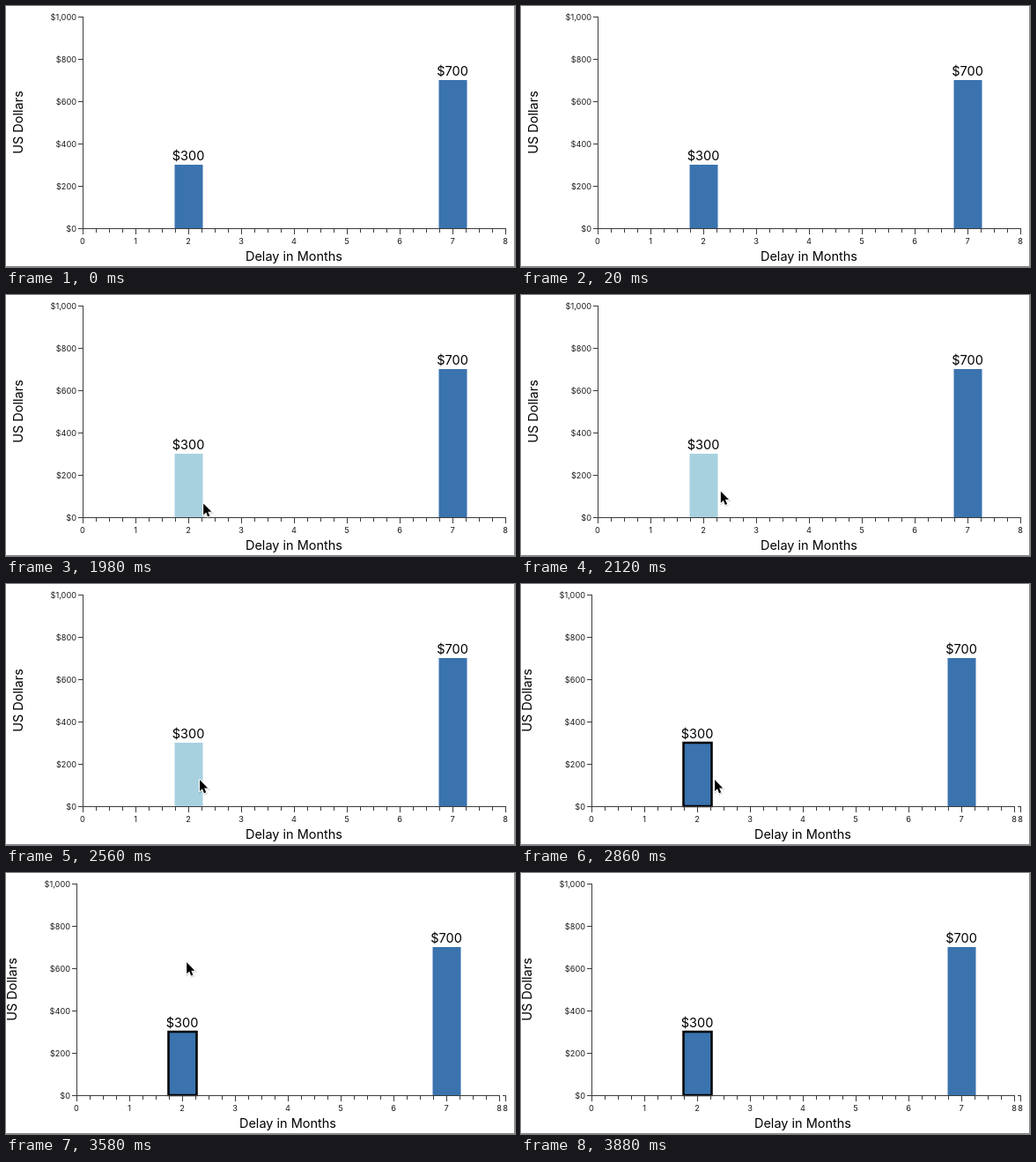
Write an HTML page that moves like this. It is 578x296 px and loops after 4980 ms.

```html
<!DOCTYPE html>
<html lang="en">
<head>
<meta charset="utf-8">
<title>Delay chart</title>
<style>
  html, body { margin: 0; width: 100%; height: 100%; overflow: hidden; background: #fff; }
  svg { display: block; width: 578px; height: 296px; }
  .tick { font: 9.2px Inter, sans-serif; fill: #1a1a1a; }
  .label { font: 14.5px Inter, sans-serif; fill: #000; text-anchor: middle; }
  .axis { fill: none; stroke: #3c3c3c; }
</style>
</head>
<body>
<svg id="stage" viewBox="0 0 578 296"></svg>
<script>
const LOOP = 4980, STEP = 20, CLICK = 2860, SHIFT = -7;
const BLUE = "#3a73ae", LIGHT = "#a8d1e0";
const LEFT = 87, BASE = 252, UNIT = 60;

const easeIn = k => k * k;
const easeOut = k => k * (2 - k);
const smooth = k => k * k * (3 - 2 * k);

// Pointer tip: each move starts where the one before ended
const enter = { x: 213, y: 293 };
const moves = [
  { start: 1760, end: 2160, x: 227, y: 222, ease: easeOut },
  { start: 2280, end: 2560, x: 220, y: 222, ease: smooth },
  { start: 3420, end: 3660, x: 200, y: 59, ease: smooth },
  { start: 3780, end: 3880, x: 201, y: -20, ease: easeIn }
];
const hovers = [[1900, 2140], [2420, CLICK], [3480, 3520]];

function add(parent, tag, attrs, text) {
  const el = document.createElementNS("http://www.w3.org/2000/svg", tag);
  for (const key in attrs) el.setAttribute(key, attrs[key]);
  if (text !== undefined) el.textContent = text;
  return parent.appendChild(el);
}

const stage = document.getElementById("stage");
const chart = add(stage, "g", {});

function bar(month, dollars) {
  const x = LEFT + month * UNIT, h = dollars * 0.24;
  const rect = add(chart, "rect",
    { x: x - 15.5, y: BASE - h, width: 32, height: h, fill: BLUE, "stroke-width": 2.5 });
  add(chart, "text", { class: "label", x, y: BASE - h - 5 }, "$" + dollars);
  return rect;
}

function xTick(parent, month) {
  const x = LEFT + month * UNIT;
  add(parent, "text", { class: "tick", x, y: 269.8, "text-anchor": "middle" }, month);
}

let axes = `M${LEFT + .5} 12V252.5M${LEFT} 252.5H568`;
for (let i = 0; i <= 5; i++) {
  const y = BASE - i * 48;
  axes += `M82 ${y + .5}H${LEFT}`;
  add(chart, "text", { class: "tick", x: 80, y: y + 3.8, "text-anchor": "end" },
    "$" + (i * 200).toLocaleString("en-US"));
}
for (let i = 0; i <= 32; i++) {
  axes += `M${LEFT + i * 15 + .5} 252V${i % 4 ? 257 : 259}`;
  if (i % 4 === 0) xTick(chart, i / 4);
}
const first = bar(2, 300);
bar(7, 700);
add(chart, "path", { class: "axis", d: axes });
add(chart, "text", { class: "label", x: 327, y: 289 }, "Delay in Months");
add(chart, "text", { class: "label", transform: "translate(19 132) rotate(-90)" }, "US Dollars");

// Axis end left unpainted after the chart moves
const rest = add(stage, "g", {});
add(rest, "path", { class: "axis", d: "M564 252.5H568M567.5 252V259" });
xTick(rest, 8);

const pointer = add(stage, "g", {});
const arrow = "M0 0V13L3 10.2L5 15.2L7.2 14.2L5.1 9.4H9.2Z";
add(pointer, "path", { d: arrow, transform: "translate(.5 1.2)",
  stroke: "#000", "stroke-width": 2, opacity: .15 });
add(pointer, "path", { d: arrow, stroke: "#fff", "stroke-width": 2,
  "paint-order": "stroke", "stroke-linejoin": "round" });

add(stage, "path", { d: "M577.5 0V296M0 295.5H578", stroke: "#858585", fill: "none" });

function tipAt(t) {
  let { x, y } = enter;
  for (const m of moves) {
    const k = m.ease(Math.min(1, Math.max(0, (t - m.start) / (m.end - m.start))));
    x += (m.x - x) * k;
    y += (m.y - y) * k;
  }
  return `translate(${x} ${y})`;
}

function show(el, on) {
  el.setAttribute("visibility", on ? "visible" : "hidden");
}

function render(ms) {
  const t = Math.floor((ms % LOOP) / STEP) * STEP;
  const clicked = t >= CLICK;
  const hovered = hovers.some(([from, to]) => t >= from && t < to);
  chart.setAttribute("transform", `translate(${clicked ? SHIFT : 0} 0)`);
  first.setAttribute("fill", hovered ? LIGHT : BLUE);
  first.setAttribute("stroke", clicked ? "#000" : "none");
  pointer.setAttribute("transform", tipAt(t));
  show(rest, clicked);
  show(pointer, t >= moves[0].start && t < moves[moves.length - 1].end);
}

const start = performance.now();
function loop() {
  render(performance.now() - start);
  requestAnimationFrame(loop);
}
loop();
</script>
</body>
</html>
```
